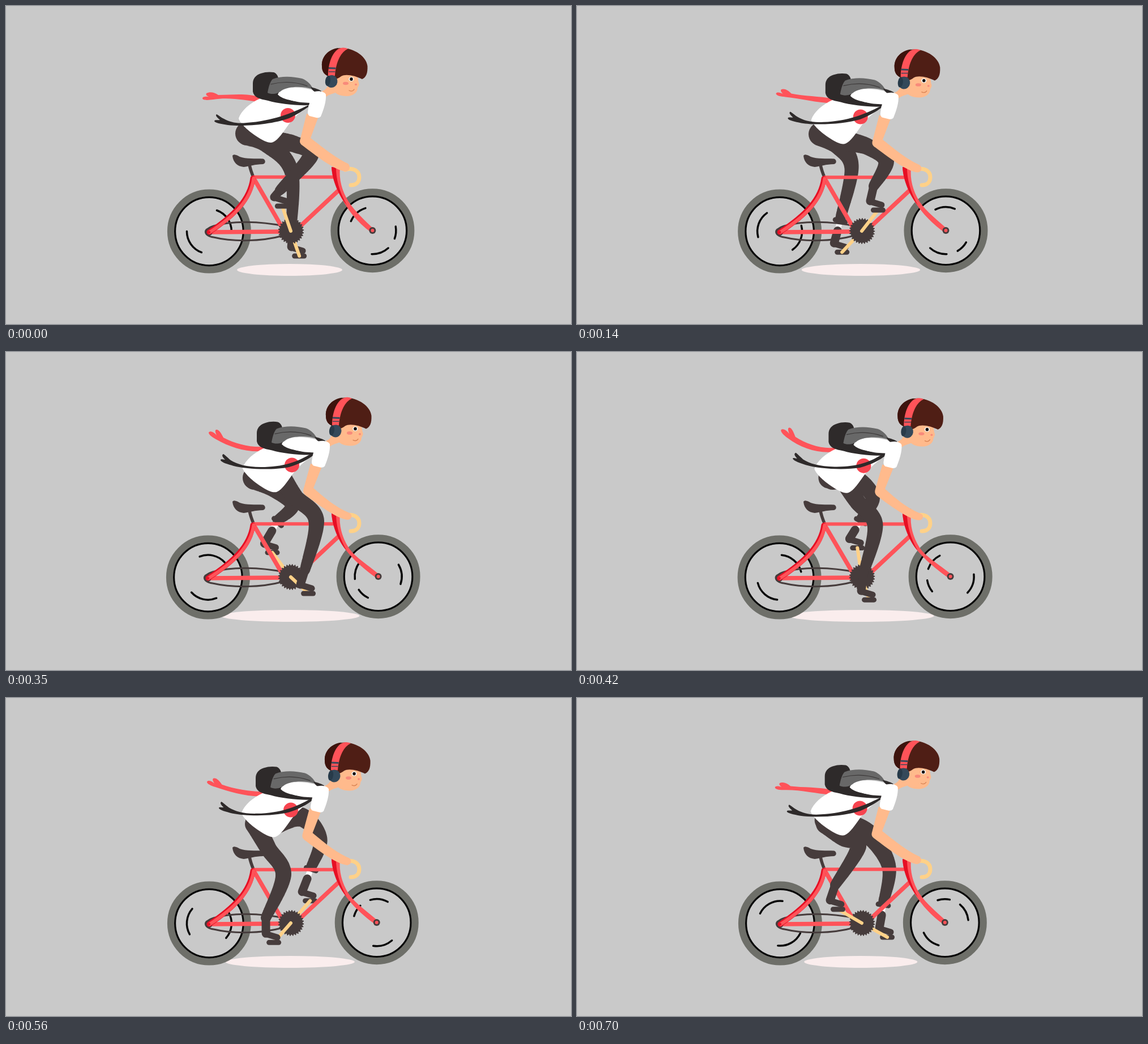
An HTML page with a canvas for the animation above (770 ms loop, 998 by 561 pixels).

```html
<!DOCTYPE html>
<html lang="en">
<head>
<meta charset="utf-8">
<title>Cyclist</title>
<style>
html, body { margin: 0; width: 100%; height: 100%; overflow: hidden; background: #c9c9c9; }
canvas { display: block; width: 998px; height: 561px; }
</style>
</head>
<body>
<canvas id="stage" width="998" height="561"></canvas>
<script>
const ctx = document.getElementById('stage').getContext('2d');
const STEP = 70, STEPS = 11, RAD = Math.PI / 180;
const C = {
  bg: '#c9c9c9', red: '#ff5359', deep: '#e60f24', dark: '#463c3c', black: '#2e2a2a',
  tan: '#ffd188', skin: '#ffba8c', hair: '#4f1e15', hairDark: '#3d130d',
  slate: '#34495a', tyre: '#6e6f69', grey: '#686868'
};
const BB = [503, 397];

const mix = (a, b, t) => a + (b - a) * t;

function fill(d, color) {
  ctx.fillStyle = color;
  ctx.fill(new Path2D(d));
}
function line(d, color, width, cap = 'round') {
  ctx.strokeStyle = color;
  ctx.lineWidth = width;
  ctx.lineCap = cap;
  ctx.lineJoin = 'round';
  ctx.stroke(new Path2D(d));
}
function oval(x, y, rx, ry, color, turn = 0) {
  ctx.fillStyle = color;
  ctx.beginPath();
  ctx.ellipse(x, y, rx, ry, turn * RAD, 0, 7);
  ctx.fill();
}
function arc(x, y, r, from, to, color, width) {
  ctx.strokeStyle = color;
  ctx.lineWidth = width;
  ctx.lineCap = 'round';
  ctx.beginPath();
  ctx.arc(x, y, r, from * RAD, to * RAD);
  ctx.stroke();
}

// Blend two path strings that share the same commands
function morph(a, b, t) {
  const end = b.match(/\d+/g);
  let i = 0;
  return a.replace(/\d+/g, v => mix(+v, +end[i++], t).toFixed(2));
}

// Rows start with the step they belong to
function pose(rows, k) {
  let i = 0;
  while (i < rows.length - 2 && rows[i + 1][0] <= k) i++;
  const a = rows[i], b = rows[i + 1], t = (k - a[0]) / (b[0] - a[0]);
  return a.map((v, n) => mix(v, b[n], t));
}

// step, hip, thigh, knee, ankle, crank angle, crank length
const NEAR = [
  [0, 470, 238, 510, 244, 538, 264, 484, 325, 251, 46.5],
  [2, 475, 238, 515, 249, 546, 274, 524, 318, 308, 47],
  [3, 478, 238, 520, 257, 557, 288, 529, 338, 337, 43.5],
  [5, 487, 222, 511, 256, 548, 297, 528, 385, 403, 42.5],
  [7, 455, 225, 478, 270, 505, 313, 486, 390, 461, 42],
  [8, 440, 222, 463, 265, 490, 312, 459, 388, 491, 45.5],
  [10, 440, 222, 469, 246, 497, 262, 456, 330, 570, 48.5]
];
const FAR = [
  [0, 426, 225, 463, 243, 504, 292, 504, 395, 71, 46.5],
  [2, 430, 226, 464, 247, 485, 287, 465, 376, 133, 51],
  [3, 433, 224, 470, 246, 494, 285, 466, 350, 164.5, 49],
  [5, 439, 222, 475, 240, 506, 270, 480, 297, 233, 54],
  [7, 465, 222, 512, 212, 539, 245, 523, 294, 290, 50],
  [8, 470, 222, 521, 210, 555, 249, 539, 299, 311, 52],
  [10, 480, 225, 518, 243, 551, 298, 541, 362, 389, 51.5]
];
const FRONT_SPIN = [[0, 228], [2, 268], [3, 311], [5, 354], [7, 404], [8, 434], [10, 490]];

function legPose(rows, k) {
  const p = pose(rows, k), a = p[9] * RAD;
  return {
    joints: [[p[1], p[2]], [p[3], p[4]], [p[5], p[6]], [p[7], p[8]]],
    pedal: [BB[0] + Math.cos(a) * p[10], BB[1] + Math.sin(a) * p[10]],
    angle: a
  };
}

// A tapered limb: discs along a smooth curve through the joints
function limb(pts, radii) {
  const at = i => pts[Math.max(0, Math.min(3, i))];
  ctx.fillStyle = C.dark;
  ctx.beginPath();
  for (let i = 0; i < 3; i++) {
    for (let t = 0; t < 1.001; t += 0.02) {
      const [x, y] = [0, 1].map(n => {
        const p = at(i)[n], q = at(i + 1)[n];
        const m = (q - at(i - 1)[n]) / 2, o = (at(i + 2)[n] - p) / 2;
        const t2 = t * t, t3 = t2 * t;
        return p * (2 * t3 - 3 * t2 + 1) + m * (t3 - 2 * t2 + t) + q * (3 * t2 - 2 * t3) + o * (t3 - t2);
      });
      const r = mix(radii[i], radii[i + 1], t);
      ctx.moveTo(x + r, y);
      ctx.arc(x, y, r, 0, 7);
    }
  }
  ctx.fill();
}

function boot([ax, ay], [px, py]) {
  const hx = px - 14, hy = py - 16;
  line(`M${ax} ${ay}L${hx} ${hy}`, C.dark, 15);
  line(`M${hx} ${hy + 1}L${px + 6} ${py - 9}`, C.dark, 11);
}
function pedal([x, y]) {
  line(`M${x - 8.5} ${y}h17`, C.dark, 9);
}
function crank([x, y]) {
  line(`M${BB}L${x} ${y}`, C.tan, 6);
}

function farLeg(leg) {
  const [, , knee, ankle] = leg.joints, [px, py] = leg.pedal;
  limb(leg.joints, [21, 17, 12.5, 9]);
  const dx = px - 13 - ankle[0], dy = py - 16 - ankle[1], len = Math.hypot(dx, dy) || 1;
  const top = [ankle[0] + dx / len * 21, ankle[1] + dy / len * 21];
  line(`M${ankle}L${top}`, '#fff', 10, 'butt');
  boot(top, leg.pedal);
  // Trouser hem
  const a = Math.atan2(ankle[1] - knee[1], ankle[0] - knee[0]) + Math.PI / 2;
  const hx = Math.cos(a) * 9, hy = Math.sin(a) * 9;
  line(`M${ankle[0] - hx} ${ankle[1] - hy + 3}L${ankle[0] + hx} ${ankle[1] + hy + 3}`, C.dark, 9);
  pedal(leg.pedal);
  crank(leg.pedal);
}

function wheel(x, y, r, turn, marks) {
  arc(x, y, 67.8, 0, 360, C.tyre, 12.4);
  arc(x, y, 60.3, 0, 360, '#050505', 3.2);
  for (const [mid, span] of marks) {
    arc(x, y, r, turn + mid - span / 2, turn + mid + span / 2, '#080808', 3.5);
  }
}

function sprocket(angle) {
  ctx.fillStyle = C.dark;
  ctx.beginPath();
  for (let i = 0; i < 112; i++) {
    const a = angle + i * Math.PI / 56, r = i % 4 < 2 ? 22.8 : 20.4;
    ctx.lineTo(503.5 + r * Math.cos(a), BB[1] + r * Math.sin(a));
  }
  ctx.fill();
}

function bike(u, rx, fx) {
  const y = 301.8 + 1.4 * u;
  line(`M490 388C450 380 400 378 ${rx + 8} 388C${rx - 10} 394 ${rx - 10} 405 ${rx + 8} 408C400 416 450 416 490 405`, C.dark, 3);
  line('M430 280Q432 290 437 302', C.dark, 5.5);
  fill('M400 264C403 260 409 264 413 266C424 270 440 269 454 269.500C459 271 459 278 454 279C440 279 429 283 420 284C409 283 401 276 400 264Z', C.dark);
  line(`M437 ${y}H583`, C.red, 6, 'butt');
  line('M592 321L516 392', C.red, 7.5, 'butt');
  line(`M437 ${y + 1}L489 393`, C.red, 7.5);
  line(`M${rx - 1} 399L490 398`, C.red, 7.5);
  oval(rx - 1, 398.5, 7, 7, C.dark);
  line(`M436 ${y + 2}C431 342 402 370 ${rx} 399`, C.deep, 9);
  line(`M437.500 ${y + 2}C432.500 343 403 371 ${rx + 1} 399`, C.red, 6);
  oval(rx, 399, 2.2, 2.2, C.deep);

  line('M583 290L589 278', C.deep, 3);
  fill(`M575 284L590 286C588 305 593 326 605 345C617 363 ${fx - 13} 379 ${fx + 2} 393L${fx - 3} 399C${fx - 28} 381 600 356 588 329C580 311 576 299 575 284Z`, C.red);
  fill('M575 284L583 285C583 305 588 326 602 351C588 335 576 308 575 284Z', C.deep);
  oval(fx, 396, 6, 6, C.dark);
  oval(fx, 396, 3, 3, C.red);
  line('M599 289C613 284 624 291 624 302C624 311 618 316 609 316', C.tan, 7);
}

function torso() {
  // Neck and face
  fill('M557 151C565 148 569 142 571 134L592 146C588 154 572 154 566 160Z', C.skin);
  fill('M575 120L620 121C622 126 622 132 623 135C625 139 622 142 621 145C621 153 612 159 602 159C590 159 580 155 574 144Z', C.skin);
  oval(610, 129, 4.5, 4, '#fff');
  oval(610, 129, 2.8, 2.9, '#17100f');
  oval(600, 136.500, 5, 2.8, '#f88a7b');
  oval(618, 138.500, 2, 1.8, '#f88a7b');
  line('M606 149Q612 152 615 147', '#d98556', 1.3);
  // Hair
  fill('M558 106C557 89 570 75 592 74C616 74 637 90 638.500 106C639 119 636 126 629 129C617 123 600 119 592 124C587 128 580 132 573 125C562 122 558 116 558 106Z', C.hair);
  fill('M558 106C557 89 570 76 587 74C575 85 570 103 570 124C562 121 558 115 558 106Z', C.hairDark);
  // Headphones
  fill('M569 123C569 102 576 80 590 74.500Q597 72 604 75.500C592 81 583 97 581 123Z', C.red);
  line('M570 109.500L582.500 110', C.slate, 3, 'butt');
  line('M570 116L581.500 116', C.slate, 1.5, 'butt');
  oval(575, 133, 10.5, 11, C.slate, 8);
  oval(568.500, 132, 4.5, 9, '#273a49', 8);

  // Shirt, print and bag
  fill('M449 163C431 171 416 184 411 198C412 205 426 219 441 229C456 239 466 243 472 240C480 237 490 222 500 208C512 192 523 186 538 172L560 160L480 150Z', '#fff');
  oval(498, 193, 13, 13, '#f6444f');
  fill('M436 137C436 128 441 122 450 119C458 116 467 116 473 117C478 119 480 123 481 127L494 130L480 156C486 163 500 168 538 170.500L537 175C511 176 480 172 463 167C447 164 438 161 436 151Z', C.black);
  fill('M482 153C489 142 516 141 545 149L564 154L562 162L538 171C514 170 497 168 482 153Z', '#fff');
  fill('M462 153C464 143 466 134 471 129C486 123 506 124 523 128C533 132 538 138 543 147C525 141 500 141 487 149C481 155 469 157 462 153Z', C.grey);
  line('M468 138C488 133 510 133 532 141', '#3c3939', 1.2);
  fill('M538 143C546 145 553 147 557 150Q556 154 551 153C545 152 541 149 538 143Z', C.black);
}

const SCARF = [
  'M449 161C425 153 398 157 375 157C368 152 360 151 354 154C352 157 356 159 358 160C352 159 347 160 347 163C348 167 358 166 366 165C395 160 425 167 446 169Z',
  'M458 167C432 169 405 162 384 151C380 143 376 136 371 137C368 139 371 144 372 147C368 142 361 138 358 142C358 146 364 150 371 154C395 168 425 177 452 175Z'
];
const STRAP = [
  'M534 175C505 189 470 203 425 206C408 208 396 205 385 199C380 197 376 193 372 191C369 193 373 197 378 201C374 202 369 200 368 203C368 206 380 208 392 210C420 213 470 209 500 198C515 191 525 184 534 178Z',
  'M541 178C515 194 490 203 450 203C425 203 408 198 397 191C391 186 386 181 384 180C380 182 383 186 387 190C383 190 379 188 379 191C381 195 392 198 402 201C425 207 470 209 500 203C520 197 533 190 543 182Z'
];
const ARM = [
  'M531 190L552 195L538 233C555 246 582 268 604 278C609 282 608 291 600 292C580 290 545 262 525 247C519 243 518 240 520 234Z',
  'M538 197L558 202L543 240C557 252 580 273 607 284C612 287 612 295 604 296C585 295 550 268 531 254C525 250 524 246 526 240Z'
];

function shifted(u, draw) {
  ctx.save();
  ctx.translate(7 * u, 6.4 * u);
  draw();
  ctx.restore();
}

function render(k) {
  // Sway: six steps forward, five steps back
  const u = k <= 6 ? k * 0.2 : (STEPS - k) * 0.24;
  const rx = 358.9 - 2 * Math.max(0, k <= 5 ? k / 5 : (8 - k) / 3);
  const fx = 647.4 + 10.2 * u;
  const near = legPose(NEAR, k), far = legPose(FAR, k);

  ctx.fillStyle = C.bg;
  ctx.fillRect(0, 0, 998, 561);
  oval(501 + u, 465.5, 93 + 29.5 * u, 10.5, '#faeded');
  wheel(rx, 397.6, 39.5, 145 + 27.6 * k, [[0, 70], [180, 70]]);
  wheel(fx, 396.2, 41.5, pose(FRONT_SPIN, k)[1], [[0, 49], [137, 30], [202, 44]]);

  shifted(u, () => oval(436, 214, 18, 19, C.dark));
  farLeg(far);
  bike(u, rx, fx);
  sprocket(near.angle);
  crank(near.pedal);
  limb(near.joints, [18, 14.5, 14, 9]);
  boot(near.joints[3], near.pedal);
  pedal(near.pedal);

  fill(morph(...SCARF, u), C.red);
  shifted(u, torso);
  fill(morph(...STRAP, u), C.black);
  fill(morph(...ARM, u), C.skin);
  shifted(u, () => fill('M545 151C554 149 562 151 565 156C566 168 561 183 556 195Q553 198 548 197L536 194Q533 192 533 187C534 180 535 172 538 166Z', '#fff'));
}

function tick() {
  render(Math.floor(performance.now() / STEP) % STEPS);
  requestAnimationFrame(tick);
}
tick();
</script>
</body>
</html>
```
